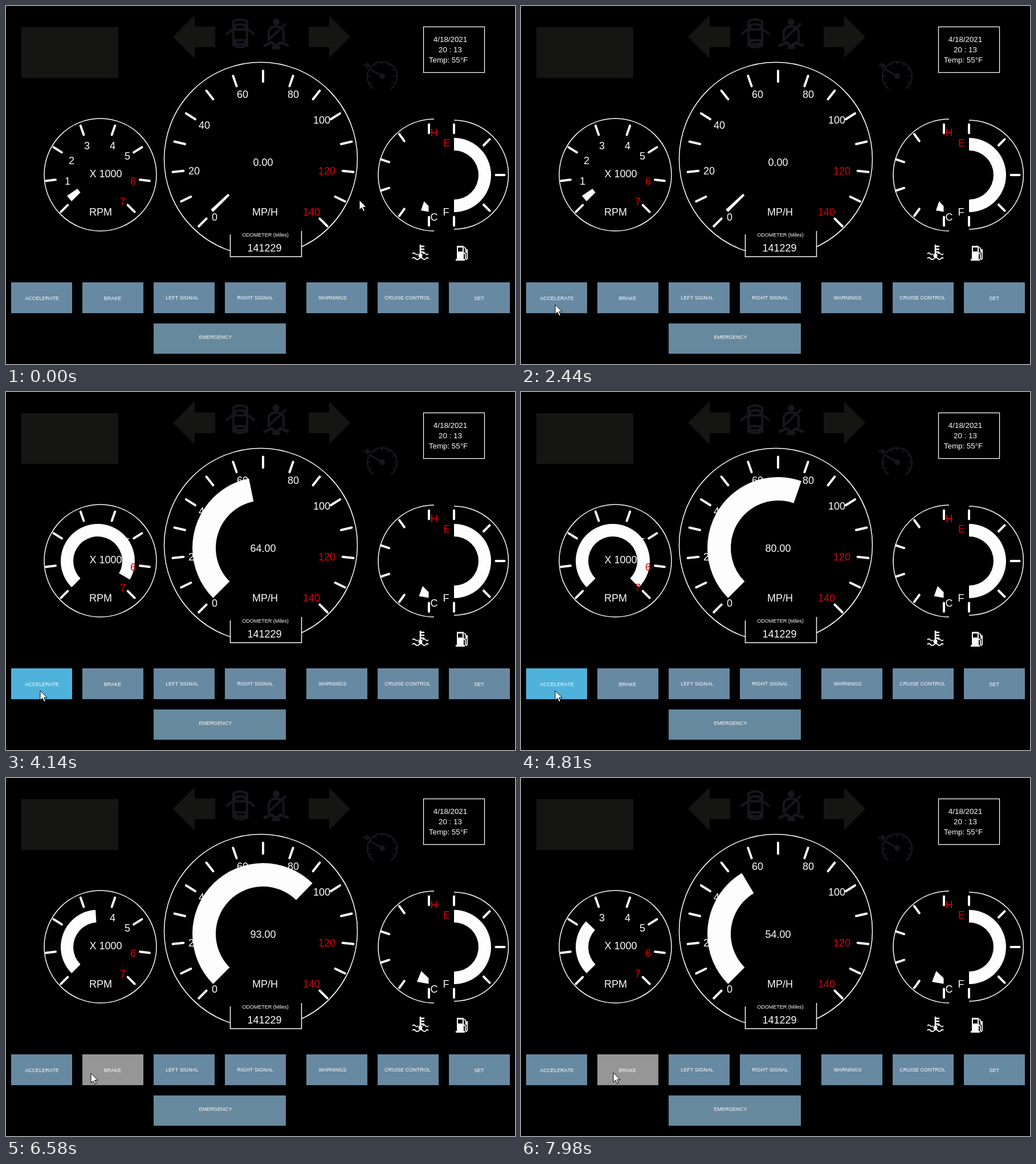
Write an HTML page with a canvas that moves like this. It is 893 px wide and 627 px high and loops after 8 s.

```html
<!DOCTYPE html>
<html lang="en">
<head>
<meta charset="utf-8">
<title>Dashboard</title>
<style>
html, body { margin: 0; width: 100%; height: 100%; overflow: hidden; background: #000; }
canvas { display: block; }
</style>
</head>
<body>
<canvas id="stage" width="893" height="627"></canvas>
<script>
const ctx = document.getElementById('stage').getContext('2d');
const LOOP = 8000;
const WHITE = '#fdfdfd', RED = '#e00008', DIM = '#151513', DIM_ICON = '#17171d';
const rad = degrees => degrees * Math.PI / 180;

// Keyframes: [time, value, ...]; each segment is interpolated, optionally eased.
const SPEED = [[3077, 0], [4206, 68], [5600, 96.4], [6550, 94.1], [6580, 93.2], [7980, 54.2], [8000, 53.7]];
const RPM_SWEEP = [[3077, 11], [4206, 270], [5600, 270], [6550, 132.5], [7980, 88.7]];
const CURSOR = [[100, 620, 340], [1440, 135, 511], [2300, 60, 523], [5650, 60, 523], [6450, 149, 517], [6600, 149, 517], [7900, 162, 516]];
const PRESS = { accelerate: [3050, 5600], brake: [6550, LOOP] };

function at(keys, time, ease = x => x) {
  const next = keys.findIndex(key => key[0] > time);
  if (next === 0) return keys[0].slice(1);
  if (next < 0) return keys[keys.length - 1].slice(1);
  const a = keys[next - 1], b = keys[next];
  const k = ease((time - a[0]) / (b[0] - a[0]));
  return a.slice(1).map((v, i) => v + (b[i + 1] - v) * k);
}
const smooth = x => x * x * (3 - 2 * x);
const during = (span, time) => time >= span[0] && time < span[1];

function label(text, x, y, size = 18, color = WHITE) {
  ctx.font = size + 'px "Liberation Sans", Arial, sans-serif';
  ctx.textAlign = 'center';
  ctx.fillStyle = color;
  ctx.fillText(text, x, y + size * 0.35);
}
function polygon(points, color) {
  ctx.fillStyle = color;
  ctx.beginPath();
  points.forEach(p => ctx.lineTo(...p));
  ctx.closePath();
  ctx.fill();
}
function rect(x, y, w, h, color) {
  ctx.fillStyle = color;
  ctx.fillRect(x, y, w, h);
}
function stroke(path, color, width) {
  ctx.strokeStyle = color;
  ctx.lineWidth = width;
  ctx.stroke(new Path2D(path));
}
function outline(x, y, r, from = 0, to = 360) {
  ctx.strokeStyle = WHITE;
  ctx.lineWidth = 1.5;
  ctx.beginPath();
  ctx.arc(x, y, r, rad(from), rad(to));
  ctx.stroke();
}
function ticks(x, y, inner, outer, from, step, count) {
  ctx.strokeStyle = WHITE;
  ctx.lineWidth = 4;
  ctx.lineCap = 'round';
  ctx.beginPath();
  for (let i = 0; i < count; i++) {
    const c = Math.cos(rad(from + step * i)), s = Math.sin(rad(from + step * i));
    ctx.moveTo(x + c * (inner + 1.5), y + s * (inner + 1.5));
    ctx.lineTo(x + c * (outer - 1.5), y + s * (outer - 1.5));
  }
  ctx.stroke();
  ctx.lineCap = 'butt';
}
function ring(x, y, inner, outer, from, sweep) {
  ctx.fillStyle = WHITE;
  ctx.beginPath();
  ctx.arc(x, y, outer, rad(from), rad(from + sweep));
  ctx.arc(x, y, inner, rad(from + sweep), rad(from), true);
  ctx.fill();
}
function button(text, x, textX, textY, color = '#6889a2', y = 484, w = 107, h = 54) {
  rect(x, y, w, h, color);
  label(text, textX, textY, 9);
}

function indicators() {
  rect(27, 37, 170, 89, DIM);
  polygon([[293, 54], [331, 16], [331, 36], [367, 36], [367, 72], [331, 72], [331, 92]], DIM);
  polygon([[604, 54], [567, 17], [567, 36], [531, 36], [531, 72], [567, 72], [567, 91]], DIM);

  // Open doors
  stroke('M399 27 Q411 20 423 27 V69 Q411 75 399 69 Z M402 34 Q411 30 420 34 V41 H402 Z' +
    'M402 60 H420 V67 H402 Z', DIM_ICON, 4);
  stroke('M397 41 L386 50 M425 41 L436 50', DIM_ICON, 4);

  // Seat belt
  ctx.fillStyle = DIM_ICON;
  ctx.beginPath();
  ctx.arc(474, 28, 6, 0, 7);
  ctx.fill();
  stroke('M461 62 V44 Q464 36 474 36 Q484 36 487 44 V62 M491 31 L461 59', DIM_ICON, 4);
  stroke('M452 70 L466 64 L474 71 L482 64 L496 70 M467 73 H481', DIM_ICON, 5);

  // Cruise control
  stroke('M645 145 A26 26 0 1 1 675 145', DIM_ICON, 2.5);
  stroke('M660 123 L638 110 M627 104 H636 M633 100 L637 104 L633 109', DIM_ICON, 3);
  ctx.beginPath();
  ctx.arc(660, 123, 5, 0, 7);
  ctx.fill();
  ctx.lineWidth = 2;
  ctx.beginPath();
  for (let a = 150; a <= 390; a += 30) {
    const c = Math.cos(rad(a)), s = Math.sin(rad(a));
    ctx.moveTo(660 + c * 20, 123 + s * 20);
    ctx.lineTo(660 + c * 26, 123 + s * 26);
  }
  ctx.stroke();
}

function clockPanel() {
  ctx.strokeStyle = WHITE;
  ctx.lineWidth = 1.3;
  ctx.strokeRect(732.5, 36.5, 107, 80);
  label('4/18/2021', 779.5, 58, 13.33);
  label('20 : 13', 779.5, 76, 13.33);
  label('Temp: 55°F', 776, 94, 13.33);
}

function tachometer(sweep) {
  outline(165.5, 295.5, 98.5);
  ticks(161, 296, 73, 93, 135, 270 / 7, 8);
  [[108, 307], [115, 271], [142, 245], [187, 245], [213, 263]].forEach((p, i) => label(i + 1, ...p));
  label('X 1000', 175, 294);
  label('RPM', 166, 361);
  ring(161, 296, 43, 65, 135, sweep);
  label('6', 223, 307, 18, RED);
  label('7', 205, 343, 18, RED);
}

function speedometer(speed) {
  outline(447, 268, 169.5);
  rect(393, 396, 126, 43, '#000');
  stroke('M393.5 400 V439 H518.5 V394', WHITE, 1.5);
  ticks(451, 273, 139, 161, 135, 270 / 14, 15);
  [[366, 370], [330, 289], [348, 209], [415, 155], [504, 155], [554, 200]].forEach((p, i) => label(i * 20, ...p));
  ring(451, 273, 83, 124, 135, Math.max(2.7, speed * 270 / 140));
  label('120', 563, 289, 18, RED);
  label('140', 536, 361, 18, RED);
  label(speed.toFixed(2), 451, 274);
  label('MP/H', 454.5, 361);
  label('ODOMETER (Miles)', 455, 401, 9);
  label('141229', 453.5, 424);
}

function coolant(time) {
  outline(751, 296, 98, 90, 270);
  ticks(742, 296, 72, 90, 90, 36, 6);
  const heat = time < 2500 ? 0 : time < 5800 ? 0.5 : 1;
  polygon([[733.5 - 5 * heat, 342 - 4 * heat], [741.5, 350.5], [741.5, 360.5], [728 - 7 * heat, 358 - heat]], WHITE);
  label('H', 751, 222, 18, RED);
  label('C', 751, 370);

  stroke('M727 418 V438 M728 421 H734 M728 426 H734 M728 431 H734', WHITE, 2.6);
  ctx.fillStyle = WHITE;
  ctx.beginPath();
  ctx.arc(727, 437, 3.5, 0, 7);
  ctx.fill();
  stroke('M713 434 q2.5 -3 5 0 t5 0 M731 434 q2.5 -3 5 0 t5 0', WHITE, 1.8);
  stroke('M713 442 q3 -3 5 0 q4 4 7 0 q3 -3 6 0 q3 4 6 0 q2 -2 4 0', WHITE, 2);
}

function fuel() {
  outline(786, 295.5, 95.5, -90, 90);
  ticks(786, 296, 72, 90, -90, 45, 5);
  ring(786, 296, 43, 65, -90, 180);
  label('E', 773, 240, 18, RED);
  label('F', 772, 361);

  rect(791, 420, 12, 26, WHITE);
  rect(793, 423, 8, 7, '#000');
  rect(789, 443, 16, 3, WHITE);
  stroke('M803 433 H805 Q806 434 806 442 Q808 446 809 442 V429 L804 422', WHITE, 1.8);
  rect(806, 426, 4, 6, WHITE);
}

function buttons(time) {
  button('ACCELERATE', 9, 63, 512, during(PRESS.accelerate, time) ? '#4eb2da' : undefined);
  button('BRAKE', 134, 187, 512, during(PRESS.brake, time) ? '#979696' : undefined);
  button('LEFT SIGNAL', 259, 309, 511);
  button('RIGHT SIGNAL', 384, 437, 511);
  button('WARNINGS', 527, 573, 511);
  button('CRUISE CONTROL', 652, 704.5, 511);
  button('SET', 777, 830, 512);
  button('EMERGENCY', 259, 367.5, 580, '#67899d', 556, 232, 53);
}

function cursor(x, y) {
  const shape = new Path2D('M0 0 V17 L4 13.3 L6.8 19.5 L9.4 18.4 L6.7 12.3 H12 Z');
  ctx.save();
  ctx.translate(x, y);
  ctx.fillStyle = WHITE;
  ctx.fill(shape);
  ctx.strokeStyle = '#000';
  ctx.lineWidth = 1;
  ctx.stroke(shape);
  ctx.restore();
}

function draw(time) {
  rect(0, 0, 893, 627, '#000');
  indicators();
  clockPanel();
  tachometer(at(RPM_SWEEP, time)[0]);
  speedometer(Math.floor(at(SPEED, time)[0]));
  coolant(time);
  fuel();
  buttons(time);
  cursor(...at(CURSOR, time, smooth));
}

const start = performance.now();
function tick() {
  draw((performance.now() - start) % LOOP);
  requestAnimationFrame(tick);
}
tick();
</script>
</body>
</html>
```
